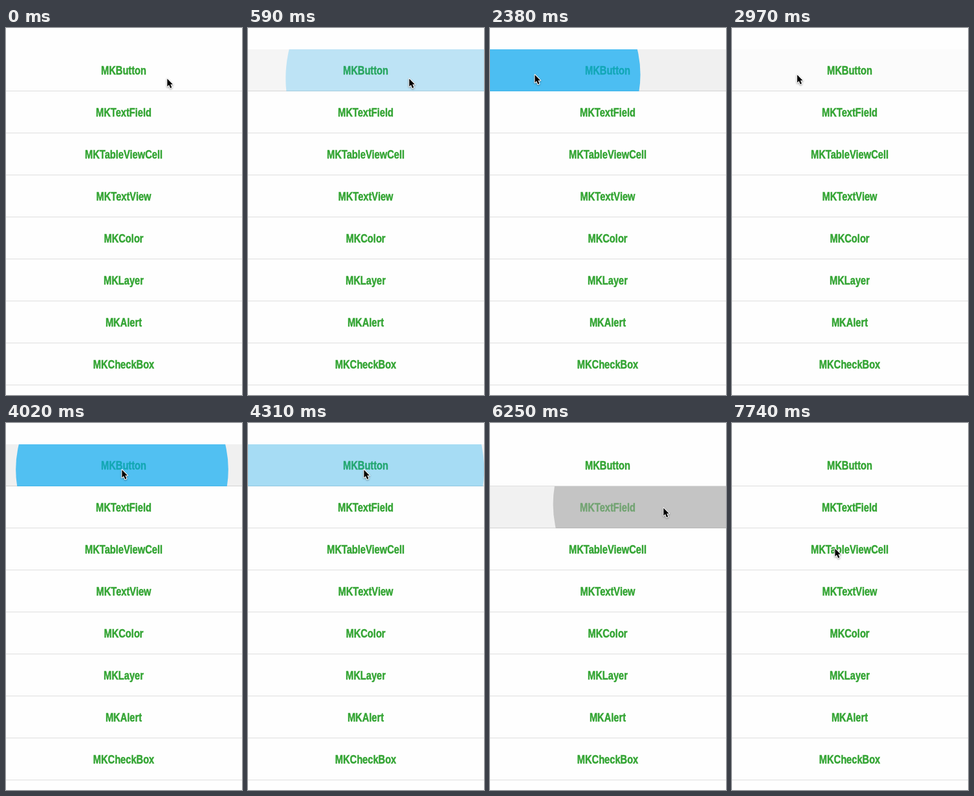
These frames come from a looping animation (365x568 px, 8 s). An HTML page with a canvas:

```html
<!DOCTYPE html>
<html lang="en">
<head>
<meta charset="utf-8">
<title>Ripple list</title>
<style>
  html, body { margin: 0; width: 365px; height: 568px; overflow: hidden; background: #fefefe; }
  canvas { display: block; width: 365px; height: 568px; }
</style>
</head>
<body>
<canvas id="stage"></canvas>
<script>
const W = 365, H = 568, LOOP = 8000;
const STEP = 148.8;     // the picture advances in even steps
const ROW_TOP = 33, ROW_H = 65;
const FADE = 850;       // life of a ripple in ms
const SHOW = 0.223;     // part of that life before it is seen
const CONDENSE = 0.815; // one condensed face for all labels
const GREEN = '#34a534', BLUE = '3,169,244', GREY = '163,163,163';

const labels = ['MKButton', 'MKTextField', 'MKTableViewCell', 'MKTextView',
                'MKColor', 'MKLayer', 'MKAlert', 'MKCheckBox'];

const taps = [
  { row: 0, at: -35,  rgb: BLUE },
  { row: 0, at: 2143, rgb: BLUE },
  { row: 0, at: 3762, rgb: BLUE },
  { row: 1, at: 5905, rgb: GREY }
];

// pointer strokes, timed in steps
const home = { x: 249, y: 78 };
const moves = [
  { from: 6,     to: 12, x: 69,  y: 72 },
  { from: 19.45, to: 23, x: 179, y: 72 },
  { from: 33,    to: 40, x: 268, y: 131 },
  { from: 45,    to: 52, x: 159, y: 194 }
];

const canvas = document.getElementById('stage');
const ctx = canvas.getContext('2d');
const ratio = window.devicePixelRatio || 1;
canvas.width = W * ratio;
canvas.height = H * ratio;

const rowY = i => ROW_TOP + i * ROW_H;
const clamp = v => Math.min(1, Math.max(0, v));
const easeIn = k => k * k;
const easeOut = k => 1 - (1 - k) ** 2;

// the hand swings sideways first, then up or down
function pointerAt(n) {
  return moves.reduce(({ x, y }, m) => {
    const k = clamp((n - m.from) / (m.to - m.from));
    return { x: x + (m.x - x) * easeOut(k), y: y + (m.y - y) * easeIn(k) };
  }, home);
}

function drawLabel(text, i) {
  ctx.save();
  ctx.translate(182, rowY(i) + 39.2);
  ctx.scale(CONDENSE, 1);
  ctx.fillText(text, 0, 0);
  ctx.strokeText(text, 0, 0);
  ctx.restore();
}

function drawRows(active) {
  ctx.fillStyle = '#fefefe';
  ctx.fillRect(0, 0, W, H);
  ctx.fillStyle = '#dedede';
  labels.forEach((_, i) => ctx.fillRect(0, rowY(i) + ROW_H - 1, W, 1));
  for (const { row, p } of active) {
    ctx.fillStyle = `rgba(0,0,0,${0.056 * (1 - 0.85 * p ** 3)})`;
    ctx.fillRect(0, rowY(row), W, ROW_H);
  }
  ctx.fillStyle = ctx.strokeStyle = GREEN;
  ctx.lineWidth = 0.5;
  ctx.font = 'bold 18px "Liberation Sans", Arial, sans-serif';
  ctx.textAlign = 'center';
  labels.forEach(drawLabel);
}

function drawRipple({ row, at, rgb, p }) {
  const { x, y } = pointerAt(at / STEP);
  ctx.save();
  ctx.beginPath();
  ctx.rect(0, rowY(row), W, ROW_H);
  ctx.clip();
  ctx.beginPath();
  ctx.arc(x + 0.5, y, 146 + 61 * p, 0, Math.PI * 2);
  ctx.fillStyle = `rgba(${rgb},${clamp(0.97 - p)})`;
  ctx.fill();
  ctx.restore();
}

function drawPointer({ x, y }) {
  ctx.save();
  ctx.translate(x + 0.4, y + 0.4);
  ctx.beginPath();
  ctx.moveTo(0, 0);
  ctx.lineTo(0, 12.2);
  ctx.lineTo(2.7, 9.6);
  ctx.lineTo(4.8, 14.6);
  ctx.lineTo(7, 13.7);
  ctx.lineTo(4.9, 8.8);
  ctx.lineTo(8.6, 8.8);
  ctx.closePath();
  ctx.lineJoin = 'round';
  ctx.lineWidth = 2;
  ctx.strokeStyle = '#fff';
  ctx.shadowColor = 'rgba(0,0,0,0.4)';
  ctx.shadowBlur = 2.5 * ratio;
  ctx.shadowOffsetY = ratio;
  ctx.stroke();
  ctx.shadowColor = 'transparent';
  ctx.fillStyle = '#000';
  ctx.fill();
  ctx.restore();
}

function draw(now) {
  const n = Math.floor((now % LOOP + 14) / STEP);
  const active = taps
    .map(tap => ({ ...tap, p: (n * STEP - tap.at) / FADE }))
    .filter(({ p }) => p > SHOW && p < 1);
  ctx.setTransform(ratio, 0, 0, ratio, 0, 0);
  drawRows(active);
  active.forEach(drawRipple);
  drawPointer(pointerAt(n));
}

const start = performance.now();
function tick() {
  draw(performance.now() - start);
  requestAnimationFrame(tick);
}
tick();
</script>
</body>
</html>
```
